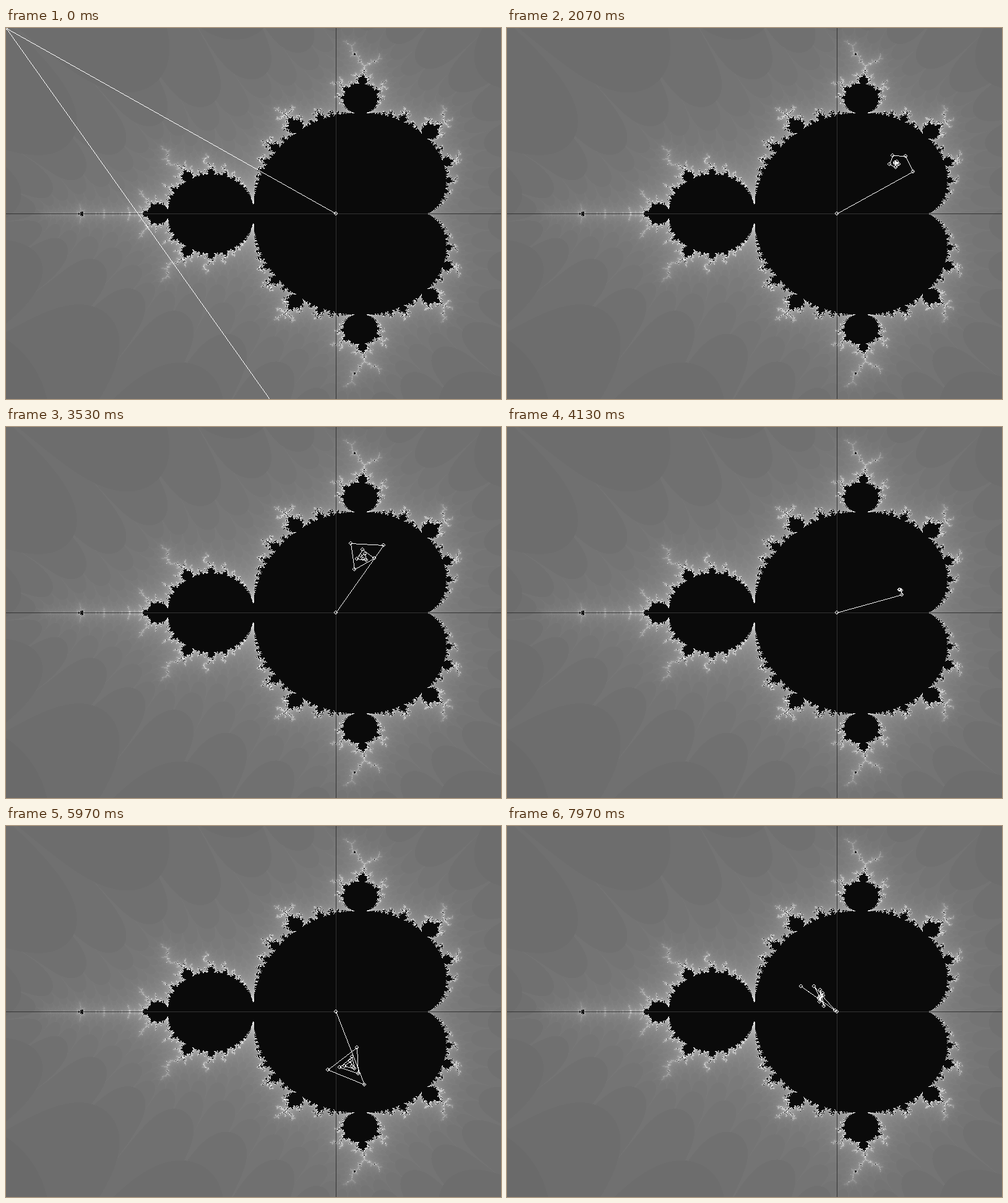
An HTML page with a canvas for the animation above (8 s loop, 800 by 600 pixels).

```html
<!DOCTYPE html>
<html lang="en">
<head>
<meta charset="utf-8">
<title>Mandelbrot orbits</title>
<style>
  html, body { margin: 0; width: 100%; height: 100%; overflow: hidden; background: #0a0a0a; }
  canvas { display: block; }
</style>
</head>
<body>
<canvas id="stage" width="800" height="600"></canvas>
<script>
const W = 800, H = 600, LOOP = 8000, FPS = 30;
const MAX_ITER = 50, ORBIT_STEPS = 10;
const AXIS_X = 533, AXIS_Y = 300;
const ctx = document.getElementById('stage').getContext('2d');

const toRe = x => x / W * 2.9 - 2.2;
const toIm = y => y / H * 2.4 - 1.2;
const toX = re => Math.trunc((re + 2.2) / 2.9 * W);
const toY = im => Math.trunc((im + 1.2) / 2.4 * H);

// Turning points of the pointer: [ms, x, y]; it waits in the corner before the first
const path = [
  [1100, 772, 98], [1400, 695, 197], [1900, 656, 232], [2300, 655, 232],
  [2833, 631, 200], [3167, 609, 190], [3467, 609, 190], [4133, 638, 271],
  [4500, 643, 326], [5133, 614, 405], [5967, 579, 418], [7033, 487, 364],
  [7633, 468, 319], [7967, 475, 259]
];
const LAST = path.length - 1;

function rate(i, axis) {
  const k = Math.min(Math.max(i, 0), LAST - 1), a = path[k], b = path[k + 1];
  return (b[axis] - a[axis]) / (b[0] - a[0]);
}

// Harmonic mean of the neighbouring rates, zero where the direction turns
function slope(i, axis) {
  const p = rate(i - 1, axis), q = rate(i, axis);
  return p * q <= 0 ? 0 : 2 * p * q / (p + q);
}

function pointerAt(ms) {
  if (ms < path[0][0]) return [0, 0];
  let i = 0;
  while (i < LAST - 1 && ms >= path[i + 1][0]) i++;
  const a = path[i], b = path[i + 1], span = b[0] - a[0];
  const u = Math.min(1, (ms - a[0]) / span), v = 1 - u;
  return [1, 2].map(axis => Math.round(
    a[axis] * v * v * (1 + 2 * u) + b[axis] * u * u * (3 - 2 * u) +
    span * u * v * (slope(i, axis) * v - slope(i + 1, axis) * u)));
}

function shade(re, im) {
  let a = re, b = im;
  for (let n = 1; n < MAX_ITER; n++) {
    [a, b] = [a * a - b * b + re, 2 * a * b + im];
    if (Math.abs(a + b) > 16) return 100 + 155 * n / MAX_ITER;
  }
  return 10;
}

function makeBackdrop() {
  const layer = document.createElement('canvas');
  layer.width = W;
  layer.height = H;
  const g = layer.getContext('2d'), image = g.createImageData(W, H);
  for (let y = 0, p = 0; y < H; y++) {
    for (let x = 0; x < W; x++, p += 4) {
      image.data.fill(shade(toRe(x), toIm(y)), p, p + 3);
      image.data[p + 3] = 255;
    }
  }
  g.putImageData(image, 0, 0);
  g.fillStyle = '#343434';
  g.fillRect(AXIS_X, 0, 1, H);
  g.fillRect(0, AXIS_Y, W, 1);
  return layer;
}

function orbit(x, y) {
  const re = toRe(x), im = toIm(y), points = [[AXIS_X, AXIS_Y], [x, y]];
  let a = re, b = im;
  for (let n = 1; n < ORBIT_STEPS && Math.hypot(a, b) < 16; n++) {
    [a, b] = [a * a - b * b + re, 2 * a * b + im];
    points.push([toX(a), toY(b)]);
  }
  return points;
}

const dot = (x, y) => ctx.fillRect(x, y, 1, 1);

// Crisp line, one pixel per step along its longer side
function line([x0, y0], [x1, y1]) {
  const dx = x1 - x0, dy = y1 - y0;
  const steps = Math.max(Math.abs(dx), Math.abs(dy), 1);
  for (let i = 0; i <= steps; i++) {
    dot(Math.round(x0 + dx * i / steps), Math.round(y0 + dy * i / steps));
  }
}

// Crisp ring, six pixels across
function ring([x, y]) {
  for (let i = -3; i < 3; i++) {
    for (let j = -3; j < 3; j++) {
      const r = Math.hypot(i + 0.5, j + 0.5);
      if (r > 2 && r < 2.7) dot(x + i, y + j);
    }
  }
}

const backdrop = makeBackdrop();
const begin = performance.now();
let shown = -1;

function draw(now) {
  const ms = Math.max(0, now - begin) % LOOP;
  const step = Math.floor(ms * FPS / 1000 + 0.11);
  if (step !== shown) {
    shown = step;
    const points = orbit(...pointerAt(step * 1000 / FPS + 0.01));
    ctx.drawImage(backdrop, 0, 0);
    ctx.fillStyle = '#fff';
    points.slice(1).forEach((point, i) => line(points[i], point));
    points.forEach(ring);
  }
  requestAnimationFrame(draw);
}
draw(begin);
</script>
</body>
</html>
```
